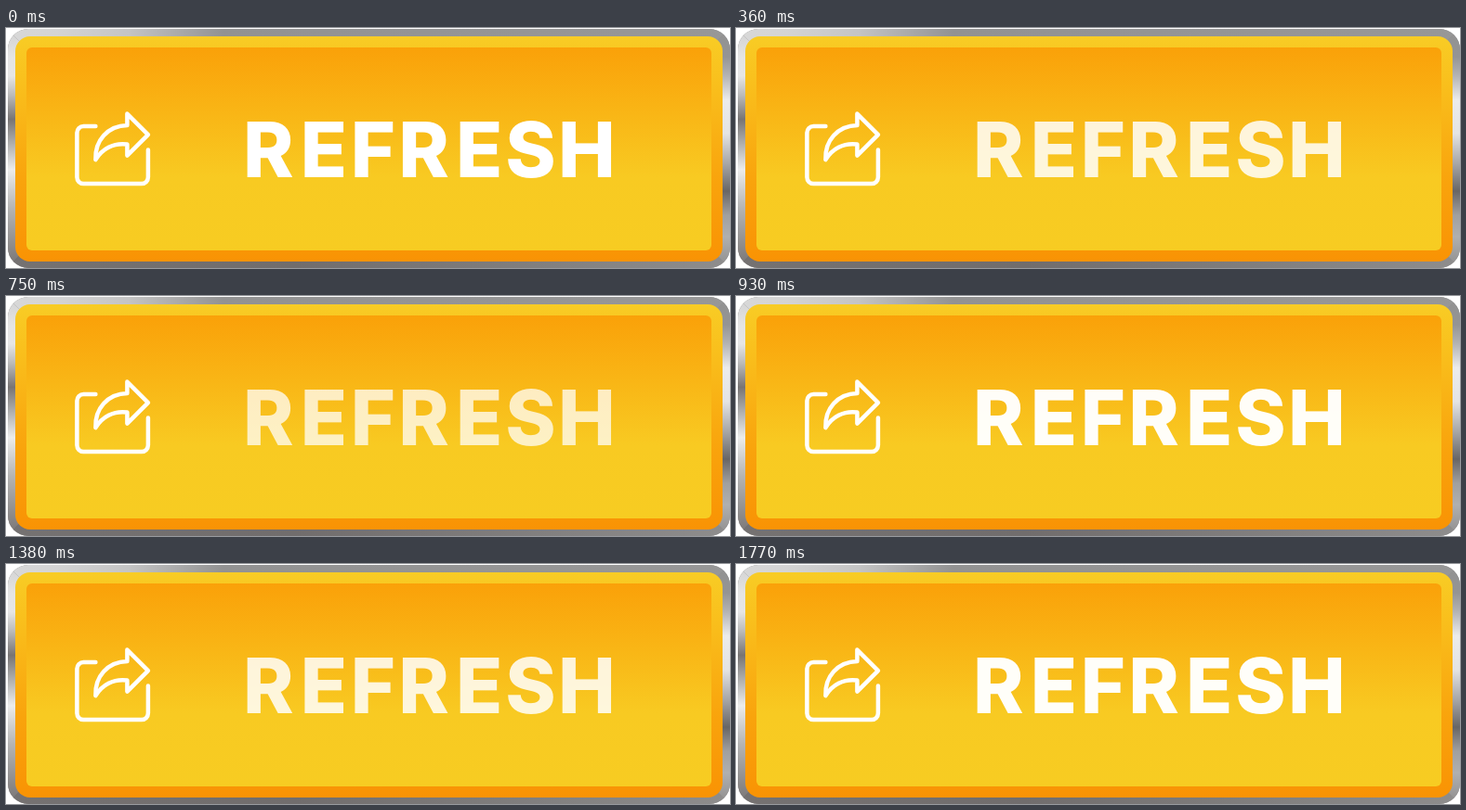
Recreate the animation shown at these times as an HTML page with a canvas. Size 779 by 259 pixels, loop 1800 ms.

```html
<!DOCTYPE html>
<html lang="en">
<head>
<meta charset="utf-8">
<title>Refresh button</title>
<style>
  html, body { margin: 0; width: 100%; height: 100%; overflow: hidden; background: #fff; }
  canvas { display: block; width: 779px; height: 259px; }
</style>
</head>
<body>
<canvas id="stage" width="779" height="259" role="img" aria-label="REFRESH"></canvas>
<script>
const W = 779, H = 259, LOOP = 1800, STEP = 30;
const ctx = document.getElementById('stage').getContext('2d');

// Pulse boundaries in steps, and how far each pulse dims the label
const knots = [0, 15.3, 30, 42, 60.5];
const depth = [0.4, 0.34, 0.43, 0.4];

// Left ink edge of each letter
const letters = [['R', 259], ['E', 320.7], ['F', 374.7], ['R', 426.3],
                 ['E', 488], ['S', 539.3], ['H', 598]];

function gradient(x0, y0, x1, y1, stops) {
  const g = ctx.createLinearGradient(x0, y0, x1, y1);
  stops.forEach(([at, color]) => g.addColorStop(at, color));
  return g;
}

function roundBox(x0, y0, x1, y1, r, fill) {
  ctx.beginPath();
  ctx.roundRect(x0, y0, x1 - x0, y1 - y0, r);
  ctx.fillStyle = fill;
  ctx.fill();
}

function polygon(points, fill) {
  ctx.beginPath();
  points.forEach(([x, y]) => ctx.lineTo(x, y));
  ctx.closePath();
  ctx.fillStyle = fill;
  ctx.fill();
}

function drawMetal() {
  ctx.save();
  ctx.beginPath();
  ctx.roundRect(2, 1, 777, 258, 22);
  ctx.clip();
  ctx.fillStyle = '#8a8888';
  ctx.fillRect(0, 0, W, H);
  polygon([[0, 0], [W, 0], [W - 24, 24], [24, 24]], gradient(0, 0, W, 0, [
    [0, '#d8d8d8'], [0.07, '#d4d4d4'], [0.17, '#c4c4c4'], [0.3, '#929292'],
    [1, '#979797']]));
  polygon([[0, H], [W, H], [W - 24, H - 24], [24, H - 24]], gradient(0, 0, W, 0, [
    [0, '#757272'], [0.4, '#716d6d'], [0.75, '#828080'], [1, '#8e8d8d']]));
  polygon([[0, 0], [24, 24], [24, H - 24], [0, H]], gradient(0, 0, 0, H, [
    [0, '#d0d0d0'], [0.12, '#e4e4e4'], [0.2, '#e6e6e6'], [0.28, '#bababa'],
    [0.38, '#777474'], [0.46, '#a2a2a2'], [0.59, '#ececec'], [0.75, '#b4b4b4'],
    [1, '#777373']]));
  polygon([[W, 0], [W - 24, 24], [W - 24, H - 24], [W, H]], gradient(0, 0, 0, H, [
    [0, '#929292'], [0.12, '#949494'], [0.2, '#b4b4b4'], [0.3, '#ececec'],
    [0.44, '#e4e4e4'], [0.57, '#a4a4a4'], [0.68, '#686666'], [0.78, '#a0a0a0'],
    [0.87, '#b0b0b0'], [1, '#8e8d8d']]));
  ctx.restore();
}

function drawIcon() {
  ctx.save();
  ctx.translate(-0.6, 0.6);
  ctx.strokeStyle = '#fff';
  ctx.lineWidth = 4.5;
  ctx.lineCap = ctx.lineJoin = 'round';
  ctx.beginPath();
  ctx.moveTo(97, 105.5);
  ctx.arcTo(77, 105.5, 77, 126, 7);
  ctx.arcTo(77, 167.5, 97, 167.5, 7);
  ctx.arcTo(153.5, 167.5, 153.5, 148, 7);
  ctx.lineTo(153.5, 131);
  ctx.stroke();
  ctx.beginPath();
  ctx.moveTo(131, 92);
  ctx.lineTo(153.5, 114.5);
  ctx.lineTo(131, 137);
  ctx.lineTo(131, 125);
  ctx.bezierCurveTo(116, 123, 104, 130, 97, 141.5);
  ctx.bezierCurveTo(96, 121, 110, 105, 131, 104.5);
  ctx.closePath();
  ctx.stroke();
  ctx.restore();
}

function drawLabel(alpha) {
  ctx.save();
  ctx.globalAlpha = alpha;
  ctx.fillStyle = '#fff';
  ctx.font = '800 82.5px Inter, sans-serif';
  ctx.textBaseline = 'alphabetic';
  for (const [ch, left] of letters) {
    ctx.fillText(ch, left + ctx.measureText(ch).actualBoundingBoxLeft, 160.6);
  }
  ctx.restore();
}

function labelAlpha(step) {
  let i = 0;
  while (step >= knots[i + 1]) i++;
  const phase = (step - knots[i]) / (knots[i + 1] - knots[i]);
  return 1 - depth[i] * (1 - Math.cos(2 * Math.PI * phase)) / 2;
}

function draw(now) {
  const step = Math.floor((now % LOOP) / STEP);
  ctx.clearRect(0, 0, W, H);
  drawMetal();
  roundBox(10, 9, 771, 252, 16, gradient(0, 9, 0, 252, [
    [0, '#f8cc25'], [0.2, '#f9c01d'], [0.65, '#f9a30c'], [1, '#f99304']]));
  roundBox(22, 21, 759, 240, 6, gradient(0, 21, 0, 240, [
    [0, '#faa109'], [0.64, '#f8ca22'], [1, '#f7cc22']]));
  drawIcon();
  drawLabel(labelAlpha(step));
}

let start;
function tick(now) {
  if (start === undefined) start = now;
  draw(now - start);
  requestAnimationFrame(tick);
}
draw(0);
requestAnimationFrame(tick);
</script>
</body>
</html>
```
